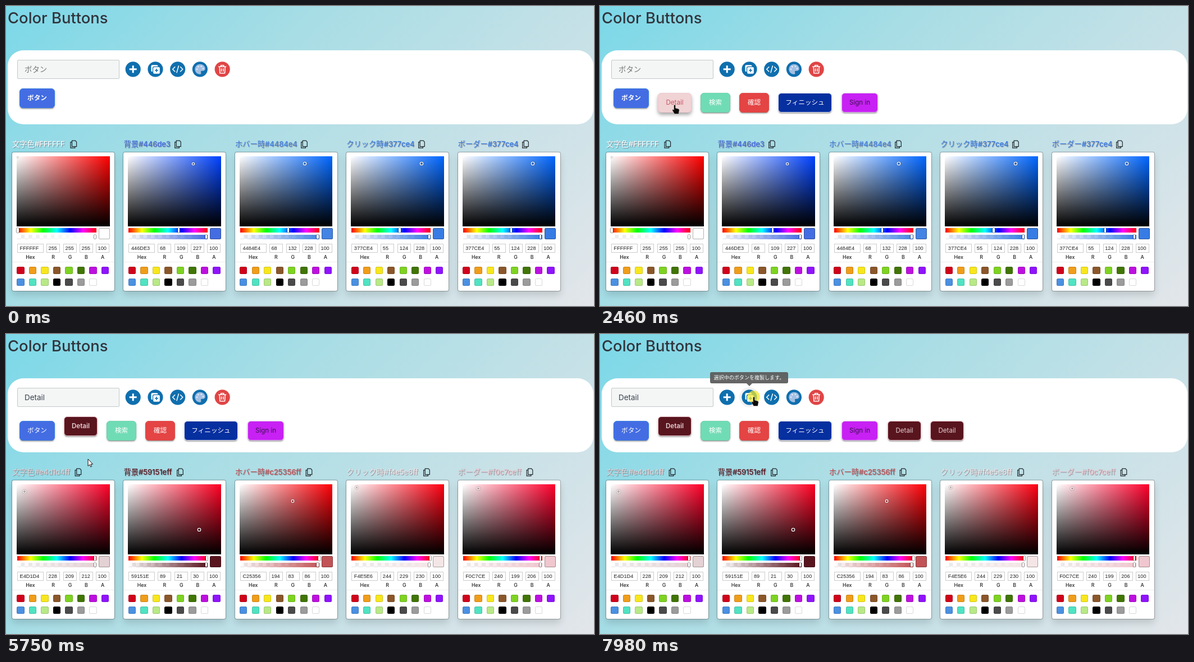
These frames come from a looping animation (1047x535 px, 8000 ms). An HTML page:

```html
<!DOCTYPE html>
<html lang="ja">
<head>
<meta charset="utf-8">
<title>Color Buttons</title>
<style>
html, body { margin: 0; width: 100%; height: 100%; overflow: hidden; }
#stage {
  position: relative; width: 1047px; height: 535px; overflow: hidden;
  background: linear-gradient(135deg, #7bd8e8, #a8dde5 36%, #c6e1e7 68%, #e3e6ea);
  font-family: Inter, "Noto Sans CJK JP", "Noto Sans CJK", sans-serif;
}
#stage div { position: absolute; box-sizing: border-box; white-space: nowrap; }
#stage svg { position: absolute; left: 0; top: 0; overflow: visible; }
.title { font-size: 27.4px; font-weight: 500; line-height: 40px; color: #32343c; }
.panel { background: #fff; border-radius: 28px; }
.name { background: #f4f6f6; border: 1px solid #c3c8ca; border-radius: 2px; padding-left: 12px; font-size: 13.4px; line-height: 33px; }
.btn {
  border: 1px solid; border-radius: 6px; font-size: 11.6px; text-align: center;
  box-shadow: 0 3px 1px -2px rgba(0,0,0,.2), 0 2px 2px rgba(0,0,0,.16), 0 1px 4px rgba(0,0,0,.14);
}
.label { font-size: 13.3px; line-height: 20px; text-shadow: 1px 1px 1px rgba(90,70,80,.55); }
.label b { font-size: 12.9px; font-weight: 500; }
.card { background: #fff; border-radius: 3px; box-shadow: 0 0 0 1px rgba(0,0,0,.27), 0 7px 13px rgba(0,0,0,.15); }
.area { overflow: hidden; }
.dot { border-radius: 50%; box-shadow: 0 0 0 1.3px #fff, inset 0 0 1px 1px rgba(0,0,0,.3), 0 0 1px 1.7px rgba(0,0,0,.35); }
.hue { background: linear-gradient(90deg, #f00, #ff0 17%, #0f0 33%, #0ff 50%, #00f 67%, #f0f 83%, #f00); }
.check { background: conic-gradient(#ebebeb 25%, #fff 0 50%, #ebebeb 0 75%, #fff 0) 0 0 / 13.3px 13.3px; }
.knob { background: #fff; border-radius: 1px; box-shadow: 0 0 1px .6px rgba(0,0,0,.65); }
.chip { border-radius: 2.5px; box-shadow: inset 0 0 0 1px rgba(0,0,0,.15); }
.chip.big { box-shadow: inset 0 0 0 1px rgba(0,0,0,.3); }
.field { border: 1px solid #ccc; font: 9.2px/14px "Liberation Sans", Arial, sans-serif; color: #222; padding-left: 2.6px; }
.cap { font-size: 8.8px; font-weight: 500; line-height: 12px; text-align: center; color: #222; }
.rule { background: #eee; }
.tip { background: rgba(92,92,92,.94); color: #fff; border-radius: 3px; font-size: 9.05px; line-height: 20px; text-align: center; transform-origin: 50% 100%; }
.tip::after { content: ""; position: absolute; left: 50%; top: 100%; margin-left: -5px; border: 5px solid transparent; border-bottom: 0; border-top-color: rgba(92,92,92,.94); }
.flash { border-radius: 50%; background: rgba(250,235,40,.7); }
</style>
</head>
<body>
<div id="stage"></div>
<script>
const LOOP = 8000, SELECT = 2540;
const stage = document.getElementById('stage');

function place(el, x, y) { el.style.left = x + 'px'; el.style.top = y + 'px'; }
function add(cls, x, y, w, h, text = '', parent = stage) {
  const d = document.createElement('div');
  d.className = cls;
  place(d, x, y);
  d.style.width = w + 'px';
  d.style.height = h + 'px';
  d.textContent = text;
  parent.appendChild(d);
  return d;
}
function addSvg(markup) {
  const box = document.createElement('template');
  box.innerHTML = `<svg width="1" height="1" fill="none">${markup}</svg>`;
  return stage.appendChild(box.content.firstChild);
}
const show = (el, on) => { el.style.display = on ? '' : 'none'; };
const clamp = v => Math.min(1, Math.max(0, v));
const rgb = hex => [1, 3, 5].map(i => parseInt(hex.slice(i, i + 2), 16));
const mix = (a, b, k) => {
  const p = rgb(a), q = rgb(b);
  return `rgb(${p.map((v, i) => Math.round(v + (q[i] - v) * k))})`;
};
function hsv(hex) {
  const [r, g, b] = rgb(hex), max = Math.max(r, g, b), d = max - Math.min(r, g, b);
  let h = 0;
  if (d) h = max === r ? (g - b) / d : max === g ? 2 + (b - r) / d : 4 + (r - g) / d;
  return { h: (h * 60 + 360) % 360, s: max ? d / max : 0, v: max / 255 };
}

// Header panel
add('title', 3, 1, 300, 40, 'Color Buttons');
add('panel', 3, 79, 1043, 132);
const nameBox = add('name', 20, 96, 182, 34);

const BLUE = '#0f6fae', ICON_X = [226.2, 266, 305.7, 345.4, 385.2], ICON_Y = 112.8;
const glyphs = [
  '<path d="M-6.5 0H6.5M0-6.5V6.5" stroke="#fff" stroke-width="3"/>',
  `<rect x="-7.5" y="-7.5" width="12" height="12" rx="2" fill="#fff"/>
   <rect x="-4.5" y="-4.5" width="13" height="13" rx="2.5" fill="#fff" stroke="${BLUE}" stroke-width="1.3"/>
   <path d="M-1 2H5M2-1V5" stroke="${BLUE}" stroke-width="1.6"/>`,
  '<path d="M-4.5-4.5L-9 0L-4.5 4.5M4.5-4.5L9 0L4.5 4.5M1.8-6.5L-1.8 6.5" stroke="#fff" stroke-width="1.5"/>',
  `<path d="M0-9C5-9 9.3-5.6 9.3-1C9.3 2 7 3.3 4 3C1.5 2.8 1 4 1.8 5.8C2.6 8 1.5 9 0 9C-5 9-9 5-9 0S-5-9 0-9Z" fill="#a3bfe2"/>
   <g fill="#eaf1f9"><circle cx="-5.3" cy="0" r="1.3"/><circle cx="-3" cy="-4.5" r="1.3"/><circle cx="2.4" cy="-5" r="1.3"/><circle cx="5.6" cy="-1.2" r="1.3"/></g>`,
  '<path d="M-7-4.5H7M-2.5-4.5V-7H2.5V-4.5M-5-4.5L-4.4 7H4.4L5-4.5M-1.7-1.5V4.3M1.7-1.5V4.3" stroke="#fff" stroke-width="1.5" stroke-linejoin="round"/>'
];
const halo = addSvg(`<circle r="18" cy="${ICON_Y}" fill="#f0f1f2"/>`).firstChild;
addSvg(glyphs.map((g, i) =>
  `<g transform="translate(${ICON_X[i]} ${ICON_Y})"><circle r="13.6" fill="${i < 4 ? BLUE : '#e04545'}"/>${g}</g>`).join(''));

// Sample buttons: label, x, width, fill, ink, border, time of creation
const DARK = '#59151e', PALE = '#e4d1d4', EDGE = '#f0c7ce';
const buttons = [
  ['ボタン', 24, 63, '#446de3', '#ffffff', '#377ce4', 0],
  ['Detail', 103, 60, '#f9d1d6', '#c85367', EDGE, 990],
  ['検索', 179, 53, '#70dcb5', '#ffffff', '#66d3aa', 1180],
  ['確認', 248, 53, '#e44444', '#ffffff', '#e04848', 1370],
  ['フィニッシュ', 317, 96, '#062f9f', '#ffffff', '#dfe4f4', 1550],
  ['Sign in', 430, 65, '#c721f3', '#3a1250', '#e6b8f2', 1720],
  ['Detail', 512, 60, DARK, PALE, EDGE, 7710],
  ['Detail', 588, 60, DARK, PALE, EDGE, 7920]
].map(([text, x, w, fill, ink, edge, born]) => {
  const el = add('btn', x, 155, w, 35, text);
  Object.assign(el.style, { background: fill, color: ink, borderColor: edge, lineHeight: '33px' });
  return { el, born };
});
const [first, detail] = buttons;
function lift(el, k) {
  el.style.top = 155 - 8 * k + 'px';
  el.style.fontWeight = k > .5 ? 600 : 400;
}

// Colour pickers
const PRESETS = ['#d0021b', '#f09d1a', '#f8e71c', '#8b572a', '#7ed321', '#417505', '#bd10e0', '#9013fe',
  '#4a90e2', '#50e3c2', '#b8e986', '#000000', '#4a4a4a', '#9b9b9b', '#ffffff'];
const FIELDS = [['Hex', 9, 47], ['R', 61, 24], ['G', 91, 24], ['B', 120, 24], ['A', 149, 24]];
const pickers = ['文字色', '背景', 'ホバー時', 'クリック時', 'ボーダー'].map((title, i) => {
  const x = 11 + 198.4 * i;
  const label = add('label', x, 236, 180, 20, title);
  const code = label.appendChild(document.createElement('b'));
  const icon = addSvg('<path d="M-2.8-6.3H3.2L5.3-4V4.2H-2.8ZM-2.8-3.8H-5.3V6.6H2.4V4.2" stroke="#20282c" stroke-width="1.2"/>').firstChild;
  const card = add('card', x, 260.5, 182, 247.5);
  const put = (cls, ...a) => add(cls, ...a, '', card);
  const area = put('area', 8, 7.5, 165.5, 124.5);
  const dot = add('dot', 0, 0, 3.6, 3.6, '', area);
  put('hue', 9, 135.5, 141, 8);
  const hueKnob = put('knob', 0, 135.8, 3.4, 7.4);
  put('check', 9, 147, 141, 8);
  const alpha = put('', 9, 147, 141, 8);
  put('knob', 145.5, 147.3, 3.4, 7.4);
  const chip = put('chip big', 154, 135.5, 20, 20);
  const fields = FIELDS.map(([cap, fx, w]) => {
    add('cap', fx, 181, w, 12, cap, card);
    return put('field', fx, 163.5, w, 15.5);
  });
  fields[0].style.paddingLeft = '3.6px';
  put('rule', 0, 195, 182, 1);
  PRESETS.forEach((c, n) => {
    put('chip', 8.4 + 21.5 * (n % 8), n < 8 ? 204.1 : 225.3, 13.3, 13.3).style.background = c;
  });
  return { code, label, icon, area, dot, hueKnob, alpha, chip, fields, shown: '' };
});
function paint(p, [code, iconX]) {
  if (p.shown === code) return;
  p.shown = code;
  const hex = code.slice(0, 7), { h, s, v } = hsv(hex);
  p.code.textContent = code;
  p.label.style.color = hex;
  p.icon.setAttribute('transform', `translate(${iconX} 246.5)`);
  p.area.style.background = 'linear-gradient(0deg, #000, rgba(0,0,0,0)), ' +
    `linear-gradient(90deg, #fff, rgba(255,255,255,0)), hsl(${h}, 100%, 50%)`;
  place(p.dot, s * 165.5 - 1.8, (1 - v) * 124.5 - 1.8);
  p.hueKnob.style.left = 8.3 + h / 360 * 141 + 'px';
  p.alpha.style.background = `linear-gradient(90deg, ${hex}00, ${hex})`;
  p.chip.style.backgroundColor = hex;
  [hex.slice(1).toUpperCase(), ...rgb(hex), 100].forEach((val, i) => { p.fields[i].textContent = val; });
}
// Per picker: time, colour code, copy icon x
const CODES = [
  [[0, '#FFFFFF', 120.3], [SELECT, '#c85367ff', 129], [5190, '#e4d1d4ff', 128.5]],
  [[0, '#446de3', 306], [SELECT, '#f9d1d6ff', 311], [3350, '#59151eff', 310]],
  [[0, '#4484e4', 531], [SELECT, '#f0d3d4ff', 538.5], [3990, '#c25356ff', 539.5]],
  [[0, '#377ce4', 740], [SELECT, '#f4e5e6ff', 749]],
  [[0, '#377ce4', 925], [SELECT, '#f0c7ceff', 932.5]]
];

// Colour of the Detail button, each step blending in
const FILL = [[0, '#f9d1d6'], [2340, '#f0d3d4'], [2530, '#f4e5e6'], [2640, '#f0d3d4'], [2720, '#f9d1d6'],
  [3350, DARK], [6000, '#c25356'], [6450, '#eddfe0'], [6650, '#c25356'], [6770, DARK]];
const INK = [[0, '#c85367'], [5190, PALE]];
const lastAt = (track, t) => track.findLastIndex(k => k[0] <= t);
function blend(track, t, span = 120) {
  const i = lastAt(track, t), [at, c] = track[i];
  return mix(track[Math.max(0, i - 1)][1], c, clamp((t - at) / span));
}

// Tooltips
const tips = [
  [add('tip', 120, 68, 211, 20, 'ランダムなテキスト、色でボタンを作成します。'), 720, 2130],
  [add('tip', 196, 68, 139, 20, '選択中のボタンを複製します。'), 7350, 9000]
];

// Pointer: time, x, y
const PATH = [[70, 915, 436], [400, 560, 270], [740, 234, 111], [2080, 234, 113], [2380, 133, 176], [2590, 133, 176],
  [3060, 343, 349], [3460, 343, 349], [3930, 510, 298], [4200, 510, 298], [4450, 325, 320], [4690, 157, 309],
  [4970, 97, 275], [5140, 33, 281], [5380, 33, 281], [5830, 165, 209], [6050, 134, 176], [6700, 134, 176],
  [7330, 274, 112], [8000, 274, 112]];
const CLICKS = [960, 1150, 1340, 1520, 1690, 2530, 3340, 3980, 5180, 6440, 7690, 7900];
function slope(i, n) {
  const a = PATH[i - 1], b = PATH[i], c = PATH[i + 1];
  const still = (p, q) => Math.hypot(p[1] - q[1], p[2] - q[2]) < 3;
  if (!a || !c || still(a, b) || still(b, c)) return 0;
  return (c[n] - a[n]) / (c[0] - a[0]);
}
function pointer(t) {
  const i = Math.min(Math.max(0, lastAt(PATH, t)), PATH.length - 2);
  const a = PATH[i], b = PATH[i + 1], d = b[0] - a[0], k = clamp((t - a[0]) / d), j = 1 - k;
  return [1, 2].map(n => j * j * (1 + 2 * k) * a[n] + k * k * (3 - 2 * k) * b[n] +
    d * k * j * (j * slope(i, n) - k * slope(i + 1, n)));
}
const flash = add('flash', 0, 0, 22, 22);
const cursor = addSvg(`
  <path d="M0 0V12.5L2.9 9.9L4.8 14L6.7 13.1L4.9 9.1H8.6Z" fill="#fff" stroke="#111" stroke-width="1"/>
  <path d="M-1.5 1Q0-1 1.5 1V6L6.8 7.4Q8.3 8 8.2 10L7 16.5H-.3L-4 10.5Q-4.3 8-2.8 8.4L-1.5 9.6Z" fill="#0a0a0a" stroke="#d8d2c8" stroke-width=".6"/>`);
const [arrow, hand] = cursor.children;

function render(t) {
  const on = clamp((t - SELECT) / 150);
  buttons.forEach(b => show(b.el, t >= b.born));
  lift(first.el, 1 - on);
  lift(detail.el, on);
  detail.el.style.backgroundColor = blend(FILL, t);
  detail.el.style.color = blend(INK, t);
  nameBox.textContent = on ? 'Detail' : 'ボタン';
  nameBox.style.color = on ? '#39414d' : '#777';
  pickers.forEach((p, i) => paint(p, CODES[i][lastAt(CODES[i], t)].slice(1)));

  for (const [el, from, to] of tips) {
    const k = clamp((t - from) / 200);
    el.style.opacity = k ** 3 * clamp(1 - (t - to) / 100);
    el.style.transform = `scale(${1 - (1 - k) ** 2})`;
  }

  const [x, y] = pointer(t);
  const icon = ICON_X.findIndex(c => Math.hypot(x - c, y - ICON_Y) < 14);
  const overDetail = t > detail.born && x > 103 && x < 163 && y > 147 && y < 190;
  const pressing = CLICKS.some(c => t >= c && t < c + 100);
  const moving = t >= 70;
  show(halo, moving && icon >= 0);
  if (icon >= 0) halo.setAttribute('cx', ICON_X[icon]);
  detail.el.style.boxShadow = overDetail ? '0 4px 6px rgba(0,0,0,.35)' : '';
  show(cursor, moving);
  place(cursor, x, y);
  show(hand, icon >= 0 || overDetail);
  show(arrow, icon < 0 && !overDetail);
  show(flash, pressing);
  place(flash, x - 11, y - 11);
}

let start;
function tick(now) {
  start ??= now;
  render((now - start) % LOOP);
  requestAnimationFrame(tick);
}
render(0);
requestAnimationFrame(tick);
</script>
</body>
</html>
```
